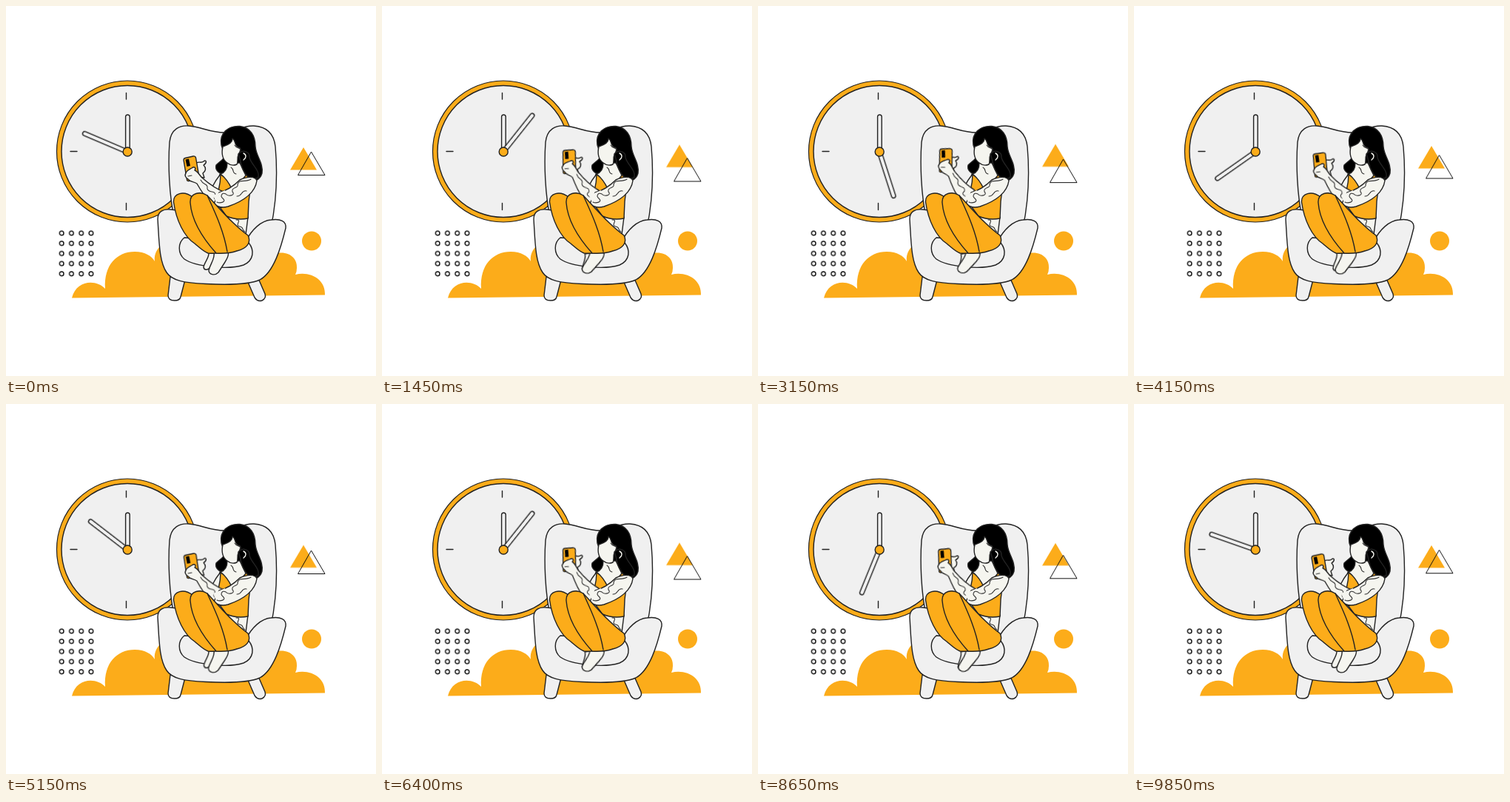
Recreate the animation shown at these times as an HTML page. Size 500 by 500 pixels, loop 9.9 s.

```html
<!DOCTYPE html>
<html lang="en">
<head>
<meta charset="utf-8">
<title>Waiting in the armchair</title>
<style>
  html, body { margin: 0; width: 100%; height: 100%; overflow: hidden; background: #fff; }
  svg { display: block; width: 100vw; height: 100vh; }
  .line { stroke: #222; stroke-width: 1.4; stroke-linejoin: round; stroke-linecap: round; }
  .thin { stroke: #333; stroke-width: 1.1; stroke-linecap: round; fill: none; }
  .orange { fill: #fcac1a; }
  .grey { fill: #f0f0f0; }
  .skin { fill: #f5f5ef; }
  .black { fill: #000; }
  .none { fill: none; }

  #minute { transform-origin: 164px 197px; animation: turn 4950ms linear infinite; }
  @keyframes turn { from { transform: rotate(293deg); } to { transform: rotate(653deg); } }

  /* eases out to the far pose, mirrored on the way back */
  .sway { animation: 2475ms cubic-bezier(.35, .33, .64, 1) infinite alternate; }
  #solid { animation-name: rise; }
  #hollow { animation-name: sink; }
  #arm { transform-origin: 312px 232px; animation-name: lift; }
  #hand { animation-name: slide; }
  #foot { transform-origin: 290px 333px; animation-name: tap; }
  #heel { transform-origin: 285px 333px; animation-name: tuck; }
  @keyframes rise { to { transform: translateY(-5px); } }
  @keyframes sink { to { transform: translateY(11.5px); } }
  @keyframes lift { to { transform: rotate(12deg); } }
  @keyframes slide { to { transform: translate(-4px, 3px); } }
  @keyframes tap { to { transform: rotate(12deg); } }
  @keyframes tuck { to { transform: rotate(-14deg); } }
</style>
</head>
<body>
<svg viewBox="0 0 500 500">
  <defs>
    <pattern id="rings" x="68.5" y="300.3" width="13.25" height="13.7" patternUnits="userSpaceOnUse">
      <circle cx="6.7" cy="6.8" r="2.8" fill="#fff" stroke="#111" stroke-width="1.4"/>
    </pattern>
  </defs>

  <path class="orange" d="M89 394.500C95 370 122 369 134 382C132 350 150 332 174 332C188 332 197 338 201 345C200 338 202 332 207 326L366 334C384 331 394 342 393 354Q393 359 391 363C412 358 432 370 431 390.500Z"/>
  <circle class="orange" cx="413" cy="317.5" r="13"/>
  <rect x="68.5" y="300.3" width="53" height="68.5" fill="url(#rings)"/>

  <path id="solid" class="orange sway" d="M402 191L420 221.5H384Z"/>
  <path id="hollow" class="sway none" stroke="#111" stroke-width="1" d="M412.5 197L431 228.5H394.5Z"/>

  <g id="clock">
    <circle class="orange" cx="164" cy="196.5" r="95.5" stroke="#222" stroke-width="1.2"/>
    <circle class="grey line" cx="164" cy="196.5" r="89"/>
    <path class="line none" d="M162.5 117.5V126M162.5 266.5V275.5M87 196.5H96"/>
    <rect class="grey line" x="161.6" y="147" width="5.6" height="50" rx="2.8"/>
    <rect id="minute" class="grey line" x="161.2" y="131.500" width="5.6" height="68" rx="2.8"/>
    <circle class="orange line" cx="164.2" cy="197" r="6"/>
  </g>

  <g id="chair" class="grey line">
    <path d="M228 290C220 255 219 212 221 184C223 166 235 161 247 162C263 163 276 171 295 171C312 171 318 161 335 162C352 163 362 172 364 190C367 225 366 262 358 300L330 330H240Z"/>
    <path d="M222 366L219 391Q219 398 228 398Q235 398 236 393L242 370Z"/>
    <path d="M326 371L336 394Q340 400 346 398Q352 395 350 389L340 366Z"/>
    <path d="M205 288C205 278 212 274 222 275L240 277L254 318H324C332 302 345 290 358 289C371 287 379 291 378 300C372 325 362 360 343 370C330 376 300 377 270 375.5C240 374 224 371 217 360C207 345 207 320 205 288Z"/>
    <path d="M241 313C232 320 232 334 241 342C255 352 300 357 321 350C335 344 336 330 328 320Z"/>
  </g>

  <g id="woman" class="line">
    <path class="skin" d="M296 278L327 285L324 309L314 312Z"/>
    <path class="thin" d="M311 289C320 288 308 297 316 298C322 299 318 303 323 305"/>
    <path class="black" d="M291 188C288 172 300 161.500 316 162.500C330 164 337 175 337 190C338 203 348 212 346 226C343 236 335 238 327 233L316 226L297 228C288 227 282 222 284 215C290 209 296 207 295 200Z"/>
    <path class="orange" d="M289 227L304 238L325 228L331 240L328 264L327 287Q312 290 298 284L283 264Q288 244 289 227Z"/>
    <path class="skin" d="M290 227Q299 234 305 247Q317 238 324 229L316 212L299 212Q299 224 290 227Z"/>
    <path class="skin" d="M290 227C286 232 282 238 279 244L287 250Q290 238 290 227Z"/>
    <path class="skin" d="M293 190C300 188 306 184 306 179C311 182 308 188 314 191C319 191 316 198 314 201C312 205 314 211 312 214Q305 217 299 212C292 207 291 199 293 190Z"/>
    <path class="thin" d="M309 188C312 194 317 190 317 195M304 218C309 221 305 226 311 227"/>
    <path class="black" d="M314 200C320 193 330 197 329 205C332 215 343 222 341 231C335 237 326 232 322 224C317 217 318 210 314 200Z"/>
    <path d="M321 199C325 201 325 205 321 208" fill="none" style="stroke:#f5f5ef"/>

    <g id="arm" class="sway">
      <path id="hand" class="skin sway" d="M256 213C259 209 264 213 267 210C271 207 272 212 267 215C271 219 270 223 266 226L268 232L260 231Z"/>
      <path class="orange" d="M242 205.500L253 203Q256 202.500 256.500 205L261 231Q261 233.500 259 234L247 236.500Q245 237 244.500 235L240 208Q240 206 242 205.500Z"/>
      <path class="black" stroke="none" d="M242.500 207.500L247 206.500L249 216L244.500 217Z"/>
      <path class="skin" d="M243 226C244 222 248 221 251 219C255 216 257 219 255 222C260 224 262 230 266 233C274 240 286 248 296 252L292 272C281 274 270 261 258 240C253 237 249 238 246 234C243 232 241 229 243 226Z"/>
      <path class="thin" d="M246 230L251 229M263 235C267 243 273 239 272 247C275 254 283 248 283 256C278 260 285 265 289 260"/>
    </g>

    <path class="skin" d="M316 235C326 230 337 230 339 236C337 250 326 262 300 271C293 273 286 272 281 267L288 252C300 249 308 243 316 235Z"/>
    <path class="skin" stroke="none" d="M280 256L296 249L299 266L285 268Z"/>
    <path class="thin" d="M331 234C324 239 315 233 313 241C315 247 304 244 306 251C311 256 300 258 297 254C292 251 289 257 293 260C299 265 289 267 285 265M325 250C318 248 319 258 312 257"/>

    <path id="heel" class="skin sway" d="M274 333C275 340 268 346 267 353C268 358 274 357 277 352L290 333Z"/>
    <path id="foot" class="skin sway" d="M281 332L300 332C302 338 298 342 296 346L287 360C282 365 274 363 274 357C276 348 283 342 281 332Z"/>
    <path class="orange" d="M252 258C240 249 226 253 226.500 265C230 290 241 312 255 321C262 327 267 332 273 334Q286 335 299 332L280 290Z"/>
    <path class="orange" d="M249 266C248 252 263 250 272 256C282 266 302 292 327 310C332 320 325 328 312 331Q300 335 284 334C266 314 251 292 249 266Z"/>
    <path class="none" d="M272 256C281 276 294 302 299 332"/>
  </g>
</svg>
</body>
</html>
```
